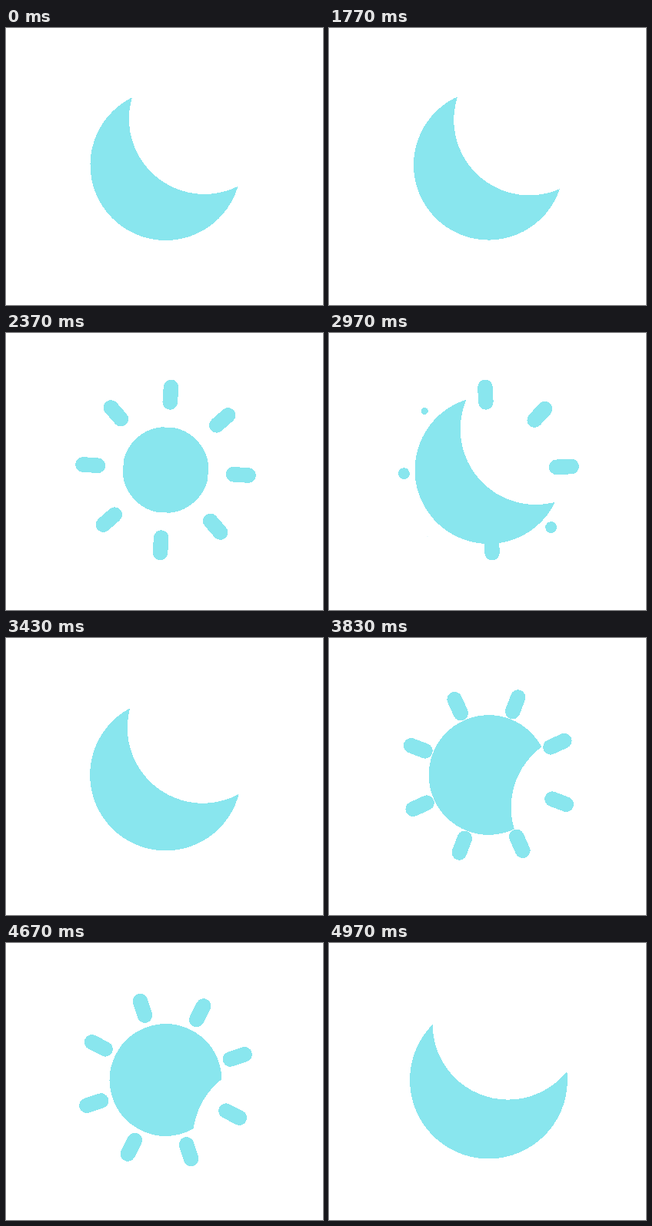
An HTML page for the animation above (5 s loop, 412 px wide and 360 px high).

```html
<!DOCTYPE html>
<html lang="en">
<head>
<meta charset="utf-8">
<title>Moon and sun toggle</title>
<style>
  html, body { margin: 0; width: 100%; height: 100%; overflow: hidden; background: #fff; }
  svg { display: block; width: 100%; height: 100%; shape-rendering: crispEdges; }
</style>
</head>
<body>
<svg viewBox="0 0 412 360">
  <mask id="bite">
    <rect x="-24" y="-24" width="48" height="48" fill="#fff"/>
    <circle id="hole" r="10" fill="#000"/>
  </mask>
  <g id="icon" fill="#89e6ee" stroke="#89e6ee" stroke-width="2" stroke-linecap="round">
    <circle id="disc" mask="url(#bite)"/>
  </g>
</svg>
<script>
const LOOP = 5000, FPS = 30;
const TOGGLES = [1747, 2665, 3663, 4537];          // ms: sun, moon, sun, moon
const RAY_BIAS = [.37, 1, 0, .37, .22, 1, 1, 1];   // rays do not vanish all at once
const MASS = 4, TENSION = 250, FRICTION = 35;

const [icon, disc, hole] = ['icon', 'disc', 'hole'].map(id => document.getElementById(id));
const clamp = v => Math.max(0, Math.min(1, v));
const set = (el, attrs) => {
  for (const name in attrs) el.setAttribute(name, attrs[name]);
};

const rays = RAY_BIAS.map((_, i) => {
  const ray = document.createElementNS('http://www.w3.org/2000/svg', 'line');
  set(ray, { transform: `rotate(${45 * i})` });
  return icon.appendChild(ray);
});

// Step response of a damped spring, t in seconds
const decay = FRICTION / (2 * MASS);
const freq = Math.sqrt(TENSION / MASS - decay * decay);
const spring = t => t <= 0 ? 0 :
  1 - Math.exp(-decay * t) * (Math.cos(freq * t) + decay / freq * Math.sin(freq * t));

// p = 0 is the moon, p = 1 the sun; the spring overshoots both
function draw(ms) {
  const p = TOGGLES.reduce((sum, start, i) =>
    sum + (i % 2 ? -1 : 1) * spring((ms - start) / 1000), 0);

  set(icon, { transform: `translate(207.5 178) scale(9.8) rotate(${40 + 50 * p})` });
  set(disc, { r: 9 - 4 * p });
  set(hole, { cx: 18 * p, cy: -8 - 4 * p });

  rays.forEach((ray, i) => {
    const size = clamp(RAY_BIAS[i] + 40 * (p - .052));
    const width = 2 * clamp(2 * size);
    const outer = 12 - width / 2;
    set(ray, {
      x1: outer - 2 * clamp(2 * size - 1),
      x2: outer,
      'stroke-width': width,
      visibility: size > 0 ? 'visible' : 'hidden'
    });
  });
}

const begin = performance.now();
function tick() {
  const ms = (performance.now() - begin) % LOOP;
  const step = Math.floor((ms + 4) * FPS / 1000) % (LOOP * FPS / 1000);
  draw(step * 1000 / FPS);
  requestAnimationFrame(tick);
}
tick();
</script>
</body>
</html>
```
